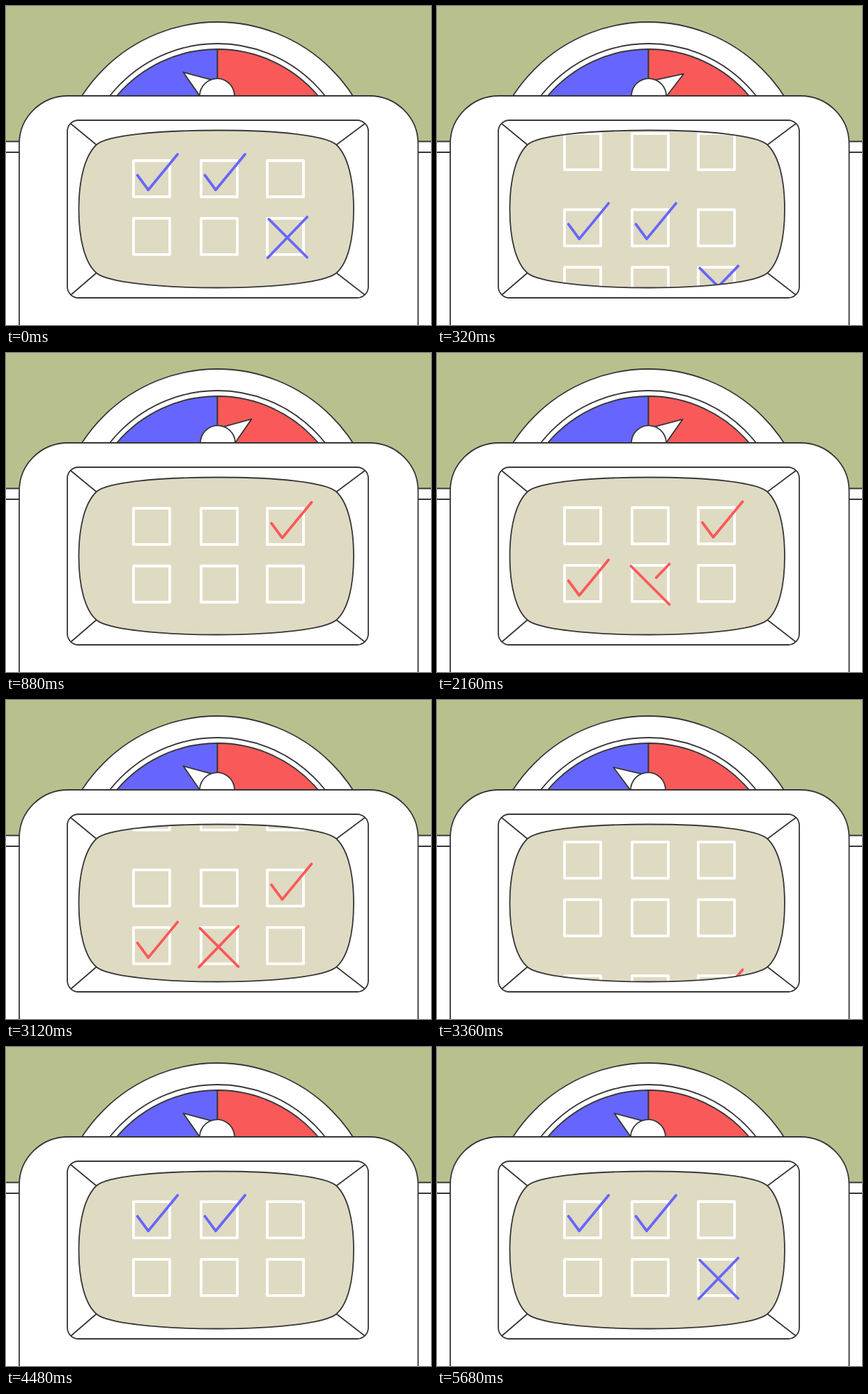
These frames come from a looping animation (610 by 458 pixels, 5840 ms). An HTML page:

```html
<!DOCTYPE html>
<html lang="en">
<head>
<meta charset="utf-8">
<title>Voting machine</title>
<style>
  html, body { margin: 0; width: 100%; height: 100%; overflow: hidden; background: #fff; }
  svg { display: block; width: 100%; height: 100%; }
  .ink { stroke: #363638; stroke-width: 1.8; stroke-linejoin: round; stroke-linecap: round; fill: none; }
  .white { fill: #fff; }
  .sheet { fill: none; stroke-width: 3.8; stroke-linejoin: round; stroke-linecap: round; }
  .box { stroke: #fff; }
</style>
</head>
<body>
<svg viewBox="0 0 610 458">
  <defs>
    <path id="glass" d="M104.5 292C104.5 250 113 215 130 199C145 186 215 178.5 304 178.5S458 186 474 199C491 215 499 250 499 292S491 369 474 383.500C458 396 393 404.500 304 404.500S145 396 130 383.500C113 369 104.500 334 104.500 292Z"/>
    <clipPath id="screen"><use href="#glass"/></clipPath>
  </defs>

  <rect width="610" height="194.500" fill="#b8c18e"/>
  <path class="ink" d="M-2 194.500H612M-2 210H612"/>

  <g class="ink">
    <circle class="white" cx="303.500" cy="254.400" r="231.400"/>
    <circle class="white" cx="303.500" cy="250.600" r="196.600"/>
    <path d="M303.500 62A189.300 189.300 0 0 0 159 129H303.500Z" fill="#6666ff"/>
    <path d="M303.500 62A189.300 189.300 0 0 1 448 129H303.500Z" fill="#fa5959"/>
    <g id="needle" class="white">
      <path d="M0 -60L15 -19H-15Z"/>
      <circle cy="-0.600" r="25"/>
    </g>
    <path class="white" d="M19 470V198A70 69 0 0 1 89 129H521.500A70 69 0 0 1 591.500 198V470Z"/>
    <rect x="88" y="164" width="432" height="255" rx="16"/>
    <path d="M93 169L130 199.500M515 169L474 199.500M94 414L130 383M514 414L474 383"/>
  </g>

  <use href="#glass" fill="#dfdac2"/>
  <g clip-path="url(#screen)">
    <g id="red" class="sheet" stroke="#fa5959"></g>
    <g id="blue" class="sheet" stroke="#6666ff"></g>
  </g>
  <use href="#glass" class="ink"/>
</svg>

<script>
const LOOP = 5840, HALF = 2880, STEP = 80;
const PITCH = 192, DRAW = 240, SWING = 55;

const add = (parent, attrs) => {
  const path = document.createElementNS('http://www.w3.org/2000/svg', 'path');
  for (const key in attrs) path.setAttribute(key, attrs[key]);
  return parent.appendChild(path);
};

const check = (x, y, start) => [{ start, d: `M${x} ${y}l15.5 21l42 -51` }];
const cross = (x, y) => [
  { start: 1760, d: `M${x} ${y}l55 55` },
  { start: 2080, d: `M${x + 55} ${y - 3}l-56.5 58.5` }
];

function makeSheet(id, strokes) {
  const group = document.getElementById(id);
  for (const y of [222, 304.8])
    for (const x of [183, 280, 375])
      add(group, { class: 'box', d: `M${x} ${y}h52v52h-52z` });
  const marks = strokes.map(({ start, d }) => ({ start, path: add(group, { d, pathLength: 1 }) }));
  return { group, marks };
}

const sheets = [
  makeSheet('red', [...check(381, 243.5, 640), ...check(188.7, 327, 1280), ...cross(278.5, 306)]),
  makeSheet('blue', [...check(188.7, 243, 640), ...check(285.5, 243, 1280), ...cross(377.2, 306)])
];
const needle = document.getElementById('needle');

const clamp = v => Math.min(1, Math.max(0, v));
const ease = u => u * u * (3 - 2 * u);

// Eased move from 0 to distance, followed by a damped swing past the end.
function springMove(t, start, end, distance, swing) {
  const after = Math.max(0, t - end) / 1000;
  return distance * ease(clamp((t - start) / (end - start)))
    + swing * Math.sin(2 * Math.PI * 1.3 * after) * Math.exp(-5 * after);
}

function placeSheet({ group, marks }, y, t) {
  group.setAttribute('transform', `translate(0 ${y.toFixed(2)})`);
  for (const { start, path } of marks) {
    const shown = clamp((t - start) / DRAW);
    path.setAttribute('visibility', shown > 0 ? 'visible' : 'hidden');
    path.setAttribute('stroke-dasharray', shown < 1 ? `${shown} 2` : 'none');
  }
}

function render(now) {
  const time = Math.floor((now % LOOP) / STEP) * STEP;
  const turn = time < HALF ? 0 : 1;
  const t = time - turn * HALF;

  const scroll = springMove(t, 156, 556, PITCH, 10);
  placeSheet(sheets[turn], scroll - PITCH, t);
  placeSheet(sheets[1 - turn], scroll, HALF);

  const angle = (springMove(t, 60, 245, 2 * SWING, 6.5) - SWING) * (turn ? -1 : 1);
  needle.setAttribute('transform', `translate(303.5 129.5) rotate(${angle.toFixed(2)})`);
}

let origin;
function tick(now) {
  origin ??= now;
  render(now - origin);
  requestAnimationFrame(tick);
}
render(0);
requestAnimationFrame(tick);
</script>
</body>
</html>
```
